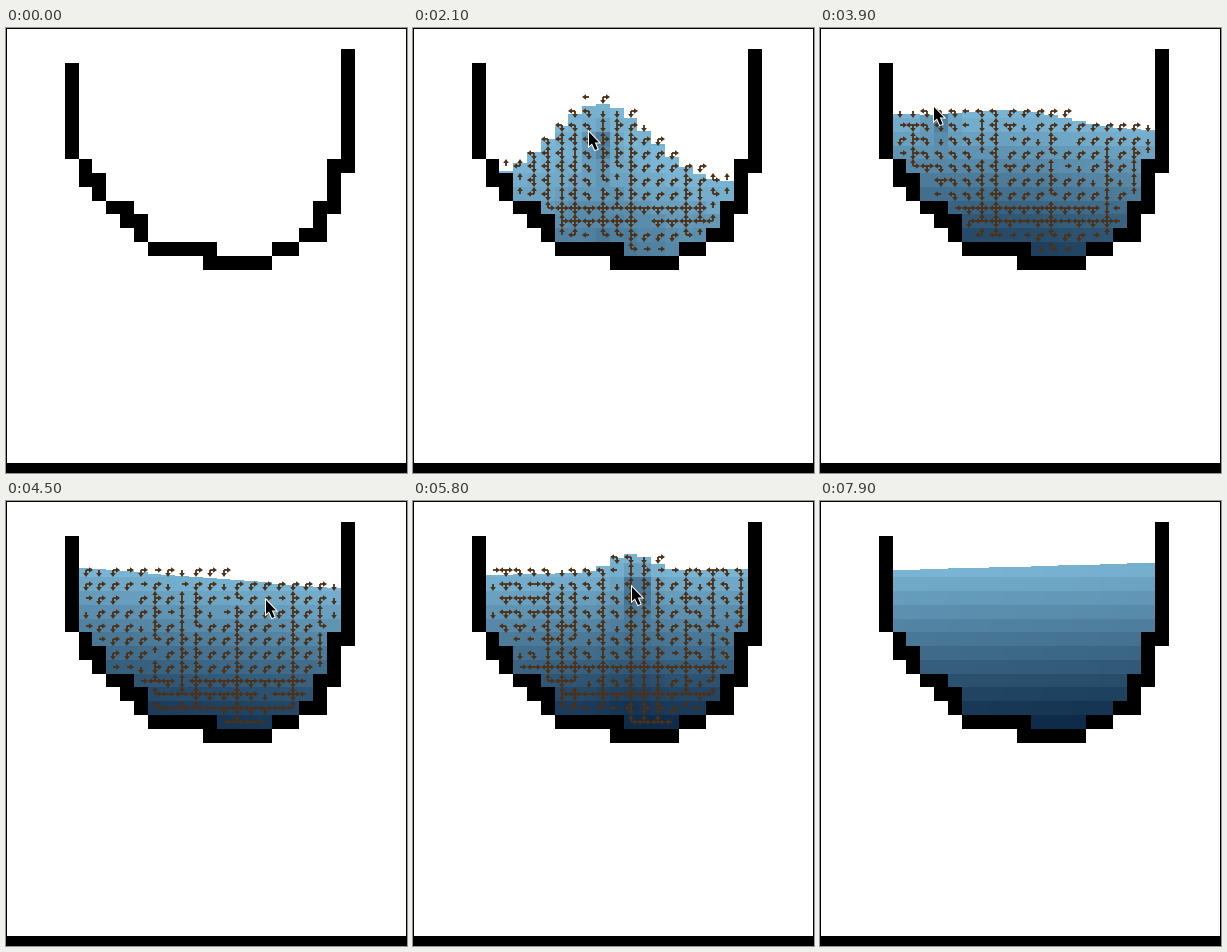
An HTML page with a canvas that plays this animation: 401x445 px, repeating every 8000 ms.

```html
<!DOCTYPE html>
<html lang="en">
<head>
<meta charset="utf-8">
<title>Liquid in a bowl</title>
<style>
html, body { margin: 0; width: 100%; height: 100%; overflow: hidden; background: #fff; }
canvas { display: block; width: 401px; height: 445px; }
</style>
</head>
<body>
<canvas id="stage" width="401" height="445"></canvas>
<script>
const ctx = document.getElementById('stage').getContext('2d');
const LOOP = 8000, STEP = 100, CELL = 400 / 29, LEFT = 58.87, TOP = 20.95;
const px = c => Math.round(LEFT + c * CELL);
const py = r => Math.round(TOP + r * CELL);
const rowAt = y => (y - TOP) / CELL;
const mix = (a, b, k) => a + (b - a) * k;
const clamp = (v, lo, hi) => Math.max(lo, Math.min(hi, v));
const bell = x => Math.exp(-x * x);

// Corners of the bowl in cells; the wall steps diagonally, then straight
const CORNERS = [
  [0, 1], [0, 7], [1, 9], [2, 9], [2, 10], [4, 11], [4, 12], [5, 12], [5, 13],
  [10, 14], [10, 15], [14, 15], [16, 14], [18, 13], [18, 11], [19, 11], [19, 8], [20, 8], [20, 0]
];
const wall = [], floor = [];
let [wc, wr] = CORNERS[0];
for (const [c, r] of CORNERS) {
  while (wc !== c || wr !== r) {
    wall.push([wc, wr]);
    wc += Math.sign(c - wc);
    wr += Math.sign(r - wr);
  }
}
wall.push([wc, wr]);
for (const [c, r] of wall) floor[c] = Math.min(floor[c] ?? r, r);

// Time, then: level, tilt, and the height, column and width of the poured heap
const WATER = [
  [1000, 172, 0, 72, 7, 1.8],
  [1500, 165, 0, 63, 8, 5.5],
  [2100, 156, 0, 80, 8.8, 5],
  [3200, 115, 6, 26, 8, 5.5],
  [4500, 77, 10, 0, 11, 4],
  [5800, 71, -3, 18, 11, 2],
  [6500, 67, -1, 0, 11, 3],
  [7900, 65.5, -3.5, 0, 11, 3]
];
const POINTER = [
  [100, 299, 331], [900, 151, 94], [1250, 170, 104], [1500, 259, 132], [2100, 176, 104],
  [3200, 173, 89], [4000, 105, 78], [4500, 260, 99], [5000, 284, 80], [5800, 219, 86]
];

function sample(keys, t) {
  let i = 0;
  while (i < keys.length - 2 && t > keys[i + 1][0]) i++;
  const [t0, ...a] = keys[i], [t1, ...b] = keys[i + 1];
  const k = clamp((t - t0) / (t1 - t0), 0, 1);
  return a.map((v, n) => mix(v, b[n], k));
}

function hash(a, b, c) {
  const s = Math.sin(a * 127.1 + b * 311.7 + c * 74.7) * 43758.5453;
  return s - Math.floor(s);
}

function waterAt(t) {
  const [level, tilt, heap, mid, width] = sample(WATER, t);
  const rest = c => level + tilt * (c - 10) / 9;
  const bump = c => heap * bell((c - mid) / width);
  return {
    surface: c => rest(c) - bump(c),
    pressureTop: c => rest(c) - bump(c) / 2
  };
}

// While the liquid first falls, its lower edge is still above the bowl
function bottomRow(c, t) {
  let limit = 110 + (t - 950) * 0.4;
  if (c > 10) limit = Math.min(limit, 228 - 17 * (c - 10) + (t - 1500) * 0.25);
  return Math.min(floor[c], Math.round(rowAt(limit)));
}

const pouring = t => t < 2900 || (t > 3500 && t < 4250) || (t > 4650 && t < 6300);

function shade(p) {
  const k = clamp(p, 0, 1);
  return `rgb(${mix(140, 14, k)},${mix(204, 44, k)},${mix(236, 74, k)})`;
}

function drawWater(t, water) {
  const gain = clamp(mix(0.5, 1, (t - 1500) / 1500), 0.5, 1);
  const noise = clamp((2600 - t) / 1100, 0, 1) * 0.12;
  const [sx, sy] = sample(POINTER, t - STEP);
  const sc = (sx - LEFT) / CELL - 0.7, sr = Math.floor(rowAt(sy));
  for (let c = 1; c < 20; c++) {
    const surf = water.surface(c), end = bottomRow(c, t);
    for (let r = Math.floor(rowAt(surf)); r < end; r++) {
      const top = Math.max(py(r), Math.round(surf));
      let p = 0.15 + 0.077 * Math.max(0, r + 0.4 - rowAt(water.pressureTop(c))) * gain;
      p += (hash(c, r, 3) - 0.5) * noise;
      if (pouring(t)) p += 0.36 * bell((c - sc) / 0.9) * bell((r - sr) / (r > sr ? 2 : 1));
      ctx.fillStyle = shade(p);
      ctx.fillRect(px(c), top, px(c + 1) - px(c), py(r + 1) - top);
    }
  }
}

function arrow(x, y, dx, dy) {
  const at = (f, s) => [x + dx * f - dy * s, y + dy * f + dx * s];
  ctx.beginPath();
  ctx.moveTo(x, y);
  ctx.lineTo(...at(4, 0));
  ctx.stroke();
  ctx.beginPath();
  ctx.moveTo(...at(7, 0));
  ctx.lineTo(...at(3, 2.8));
  ctx.lineTo(...at(3, -2.8));
  ctx.fill();
}

// Downhill and downward arrows, joined here and there into long runs
function drawFlow(t, water) {
  const active = clamp((7800 - t) / 1400, 0, 1);
  ctx.strokeStyle = ctx.fillStyle = '#4d3016';
  ctx.lineWidth = 1.8;
  for (let c = 1; c < 20; c++) {
    const slope = water.surface(c + 1) - water.surface(c - 1);
    const end = bottomRow(c, t);
    const column = hash(c, Math.floor(t / 900), 2) > 0.65;
    for (let r = Math.floor(rowAt(water.surface(c) - 2)); r < end; r++) {
      if (hash(c, r, 9) > active) continue;
      const x = px(c) + 7, y = py(r) + 7;
      const tick = Math.floor(t / 300 + hash(c, r, 1));
      const layer = r > 9 && hash(r, Math.floor(t / 900), 4) > 0.6;
      const both = layer || (Math.abs(slope) < 1.2 && hash(c, r, tick) > 0.75);
      const open = d => c + d > 0 && c + d < 20 && r < floor[c + d];
      const side = hash(c, r, tick + 2) > 0.1;
      if (side && (slope < 0 || both) && open(-1)) arrow(x, y, -1, 0);
      if (side && (slope >= 0 || both) && open(1)) arrow(x, y, 1, 0);
      const rising = t < 3700 && (c < 4 || c > 16);
      if (rising || (column && r * CELL + TOP > water.surface(c) + 6)) arrow(x, y, 0, -1);
      if (!rising && r + 1 < floor[c] && hash(r, c, tick + 5) < 0.88) arrow(x, y, 0, 1);
    }
  }
}

function drawBowl() {
  ctx.fillStyle = '#000';
  for (const [c, r] of wall) {
    ctx.fillRect(px(c), py(r), px(c + 1) - px(c), py(r + 1) - py(r));
  }
  ctx.fillRect(0, 0, 401, 1);
  ctx.fillRect(0, 0, 1, 445);
  ctx.fillRect(400, 0, 1, 445);
  ctx.fillRect(0, 435, 401, 10);
}

function drawPointer(t) {
  const [x, y] = sample(POINTER, t).map(Math.round);
  const shape = new Path2D('M0 0V14L3 11.5L6 18L8.5 17L5.8 10.5H10Z');
  ctx.save();
  ctx.translate(x, y);
  ctx.lineWidth = 2;
  ctx.strokeStyle = '#fff';
  ctx.fillStyle = '#000';
  ctx.stroke(shape);
  ctx.fill(shape);
  ctx.restore();
}

function draw(t) {
  ctx.fillStyle = '#fff';
  ctx.fillRect(0, 0, 401, 445);
  if (t >= 1000) {
    const water = waterAt(t);
    drawWater(t, water);
    drawFlow(t, water);
  }
  drawBowl();
  if (t >= 100 && t < 6300) drawPointer(t);
}

const start = performance.now();
function frame() {
  const t = (performance.now() - start) % LOOP;
  draw(Math.floor(t / STEP) * STEP);
  requestAnimationFrame(frame);
}
frame();
</script>
</body>
</html>
```
